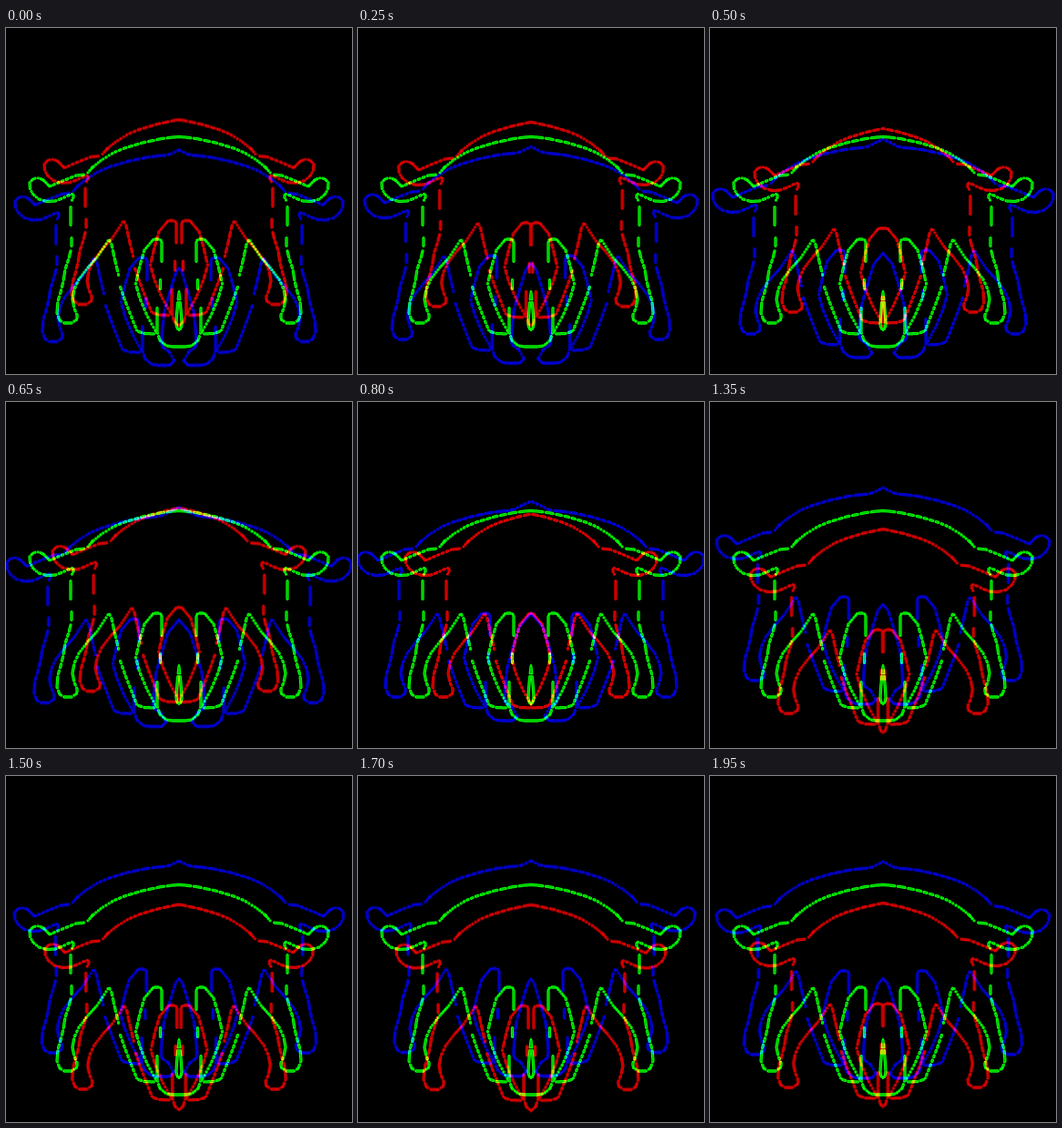
Write an HTML page with a canvas that moves like this. It is 380x380 px and loops after 2 s.

```html
<!DOCTYPE html>
<html lang="en">
<head>
<meta charset="utf-8">
<title>Mirrored outlines</title>
<style>
  html, body { margin: 0; width: 100%; height: 100%; overflow: hidden; background: #000; }
  canvas { display: block; width: 380px; height: 380px; }
</style>
</head>
<body>
<canvas id="stage" width="380" height="380"></canvas>
<script>
const SIZE = 380, MID = SIZE / 2;
const LOOP = 2000, STEP = 50;
const RADIUS = 26, SWING = 52 * Math.PI / 180, MIDPOINT = 800, HALF_SWING = 1700;

// The outline, in pieces with open gaps between them.
const parts = [
  // roof
  '89,160 95,153 105,145 118,137 130,132 150,126 170,121.7 183,120 190,119.5 197,118 206,113.5 216,109',
  // curl at the wing tip
  '87,161 77,162 62,168 48,174 41,167 36,164.7 30,165.5 26,170 26.5,177 30,183 36,188 45,190.5 54,190 62,187 68,184 74,182 74,186 72,190',
  '71,195 71,218',
  '72,229 72,241',
  // foot
  '71,245 69,253 65,265 63,278 60,290 57,300 56,313 59,321 64,324 72,324 78,320 78,315 75,308 73,298 75,287 80,276 90,263 100,252 108,240 113,232 116,238 119,252 124,273',
  '125,283 131,300 138,318 144,333 152,335.5 164,336',
  // inner leaf
  '171,258 171,234 169,232 162,232 152,244 147,261 142.5,281 147,297 155,316 165,334',
  '169.5,275 169.5,288',
  // bowl, then up the centre
  '166,306 166,334 169,343 176,349 183,350 196,350 201,345 195,335 188,330 187,325 187.5,315 188.5,304 190,291 195,273 203,247 216,232'
].map(s => s.split(' ').map(p => p.split(',').map(Number)));

// Split a polyline into short runs, one for each two-pixel stair of the line.
function runsOf(points) {
  const runs = [];
  let lastKey = null;
  for (let i = 1; i < points.length; i++) {
    const [x0, y0] = points[i - 1], [x1, y1] = points[i];
    const dx = x1 - x0, dy = y1 - y0;
    const flat = Math.abs(dx) > Math.abs(dy);
    const count = Math.ceil(Math.hypot(dx, dy) * 4);
    for (let k = 0; k <= count; k++) {
      const p = [x0 + dx * k / count, y0 + dy * k / count];
      const key = (flat ? 'h' : 'v') + Math.round((flat ? p[1] : p[0]) / 2);
      if (key !== lastKey) runs.push([]);
      lastKey = key;
      runs[runs.length - 1].push(p);
    }
  }
  return runs;
}

const runs = parts.flatMap(runsOf);

function trace(g, run, trim) {
  const n = Math.min(Math.round(trim * 4), Math.floor((run.length - 1) / 2));
  const inner = run.slice(n, run.length - n);
  g.beginPath();
  g.moveTo(...inner[0]);
  inner.forEach(p => g.lineTo(...p));
  g.lineTo(inner[inner.length - 1][0] + 0.01, inner[inner.length - 1][1]);
  g.stroke();
}

function makeOutline(color, core) {
  const sheet = document.createElement('canvas');
  sheet.width = sheet.height = SIZE;
  const g = sheet.getContext('2d');
  g.lineCap = g.lineJoin = 'round';
  for (const run of runs) {
    g.strokeStyle = color;
    g.lineWidth = 3.3;
    trace(g, run, 1.7);
    if (run.length > 12) {
      g.strokeStyle = core;
      g.lineWidth = 0.9;
      trace(g, run, 2);
    }
  }
  return sheet;
}

// Each layer is displaced by its sign times the swinging offset.
const layers = [
  { sheet: makeOutline('#e80000', '#a00000'), sign: 1 },
  { sheet: makeOutline('#00ff00', '#008c00'), sign: 0 },
  { sheet: makeOutline('#0000e0', '#0000a8'), sign: -1 }
];

const ctx = document.getElementById('stage').getContext('2d');

function drawHalf(dx, dy) {
  ctx.save();
  ctx.beginPath();
  ctx.rect(0, 0, MID, SIZE);
  ctx.clip();
  ctx.globalCompositeOperation = 'lighter';
  for (const { sheet, sign } of layers) ctx.drawImage(sheet, sign * dx, sign * dy);
  ctx.restore();
}

function draw(t) {
  const angle = SWING * Math.sin(Math.PI * (t - MIDPOINT) / HALF_SWING);
  const dx = RADIUS * Math.cos(angle), dy = RADIUS * Math.sin(angle);
  ctx.setTransform(1, 0, 0, 1, 0, 0);
  ctx.fillStyle = '#000';
  ctx.fillRect(0, 0, SIZE, SIZE);
  drawHalf(dx, dy);
  ctx.setTransform(-1, 0, 0, 1, SIZE, 0);
  drawHalf(dx, dy);
}

const start = performance.now();
function tick() {
  const t = (performance.now() - start) % LOOP;
  draw(Math.floor(t / STEP) * STEP);
  requestAnimationFrame(tick);
}
tick();
</script>
</body>
</html>
```
